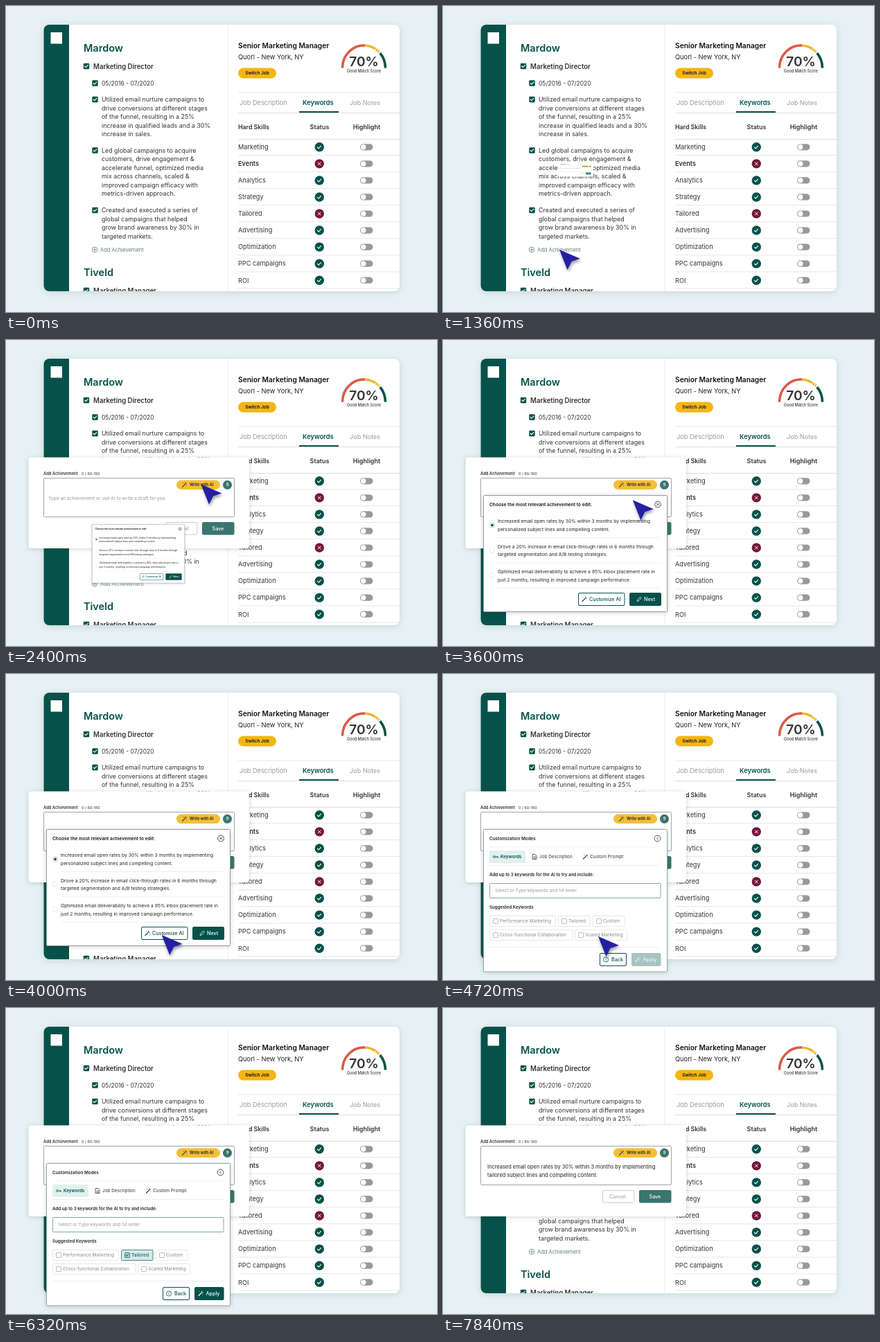
Recreate the animation shown at these times as an HTML page. Size 622 by 442 pixels, loop 8 s.

```html
<!DOCTYPE html>
<html lang="en">
<head>
<meta charset="utf-8">
<title>Resume builder</title>
<style>
  html, body { margin: 0; width: 100%; height: 100%; overflow: hidden; background: #e6f1f3; }
  svg { display: block; width: 622px; height: 442px; font-family: Inter, "Open Sans", sans-serif; }
  .soft { filter: drop-shadow(0 2px 5px #00303022); }
  .card { filter: drop-shadow(0 1px 3px #00202030); }
  .pointer { filter: drop-shadow(1px 3px 2px #0006); }
</style>
</head>
<body>
<svg id="stage" viewBox="0 0 622 442"></svg>
<script>
const GREEN = '#06524a', TEAL = '#3a756f', GOLD = '#f5b513', INK = '#333', GRAY = '#999';

// y is the vertical middle of the capitals
const text = (x, y, s, size, fill = INK, weight = 400, anchor = 'start') =>
  `<text x="${x}" y="${y + size * .36}" font-size="${size}" fill="${fill}" font-weight="${weight}" text-anchor="${anchor}">${s}</text>`;
const lines = (x, y, gap, size, list, fill) =>
  list.map((s, i) => text(x, y + gap * i, s, size, fill)).join('');
const box = (x, y, w, h, fill, r = 0, stroke = 'none', sw = 1) =>
  `<rect x="${x}" y="${y}" width="${w}" height="${h}" rx="${r}" fill="${fill}" stroke="${stroke}" stroke-width="${sw}"/>`;
const dot = (x, y, r, fill, stroke = 'none', sw = .8) =>
  `<circle cx="${x}" cy="${y}" r="${r}" fill="${fill}" stroke="${stroke}" stroke-width="${sw}"/>`;
const path = (d, stroke, sw = 1) =>
  `<path d="${d}" fill="none" stroke="${stroke}" stroke-width="${sw}" stroke-linecap="round" stroke-linejoin="round"/>`;
const rule = (x1, x2, y, color = '#e6e6e6', sw = 1) =>
  `<path d="M${x1} ${y}H${x2}" stroke="${color}" stroke-width="${sw}"/>`;

const tick = (x, y, color = '#fff', k = 1) =>
  path(`M${x - 2.3 * k} ${y}l${1.6 * k} ${1.7 * k}l${3 * k} ${-3.3 * k}`, color, 1.1);
const checked = (x, y) => box(x - 4.2, y - 4.2, 8.4, 8.4, GREEN, 1.2) + tick(x, y);
const wand = (x, y, color) =>
  path(`M${x - 3} ${y + 3}L${x + 1.4} ${y - 1.4}`, color, 1.2)
  + path(`M${x + 1.4} ${y - 3.4}l.4 1.6l1.6 .4M${x - 1.6} ${y - 2.6}h.1M${x + 2.8} ${y + 1.4}h.1`, color, .8);
const pencil = (x, y, color) =>
  path(`M${x - 2.8} ${y + 2.8}l.6-2.2l4-4l1.6 1.6l-4 4z`, color, .8);
const button = (x, y, w, h, s, tx, fill, stroke, color) =>
  box(x, y, w, h, fill, 1.5, stroke) + text(tx, y + h / 2, s, 7.2, color, 500);

// Arc on the score gauge; a and b run from 0 (left) to 1 (right)
function arc(a, b, color) {
  const at = f => `${516.5 - 31 * Math.cos(f * Math.PI)} ${89.5 - 32.5 * Math.sin(f * Math.PI)}`;
  return `<path d="M${at(a)}A31 32.5 0 0 1 ${at(b)}" fill="none" stroke="${color}" stroke-width="3.6"/>`;
}

function resume() {
  return text(112, 61, 'Mardow', 14.5, GREEN, 600)
    + checked(116, 87) + text(126, 88, 'Marketing Director', 9.65, INK, 600)
    + checked(128.5, 111.5) + text(138, 111.5, '05/2016 - 07/2020', 8.5)
    + checked(128.5, 135) + lines(138, 135, 12.5, 8.9, [
      'Utilized email nurture campaigns to', 'drive conversions at different stages',
      'of the funnel, resulting in a 25%', 'increase in qualified leads and a 30%', 'increase in sales.'])
    + checked(128.5, 208.5) + lines(138, 208.5, 12.5, 8.9, [
      'Led global campaigns to acquire', 'customers, drive engagement &amp;',
      'accelerate funnel, optimized media', 'mix across channels, scaled &amp;',
      'improved campaign efficacy with', 'metrics-driven approach.'])
    + checked(128.5, 295) + lines(138, 295, 12.5, 8.9, [
      'Created and executed a series of', 'global campaigns that helped',
      'grow brand awareness by 30% in', 'targeted markets.'])
    + dot(128, 352, 3.8, 'none', '#5d7f7b') + path('M126 352h4M128 350v4', '#5d7f7b', .8)
    + text(136, 352.5, 'Add Achievement', 7.5, '#5d7f7b')
    + text(112, 384.5, 'Tiveld', 14.5, GREEN, 600)
    + checked(116, 411) + text(126, 411.5, 'Marketing Manager', 9.65, INK, 600);
}

function score() {
  return text(335, 57.5, 'Senior Marketing Manager', 10.25, '#111', 600)
    + text(335, 74, 'Quorl - New York, NY', 9.3, '#222')
    + box(335, 89.5, 55, 15, GOLD, 7.5) + text(362.5, 97, 'Switch Job', 6.4, '#222', 700, 'middle')
    + arc(0, .52, '#db5a45') + arc(.52, .75, '#edb52c') + arc(.77, 1, GREEN)
    + dot(535, 63.5, 2.2, GOLD, '#fff')
    + text(516.5, 80, '70%', 19.2, INK, 600, 'middle')
    + text(516.5, 94, 'Good Match Score', 5.5, INK, 500, 'middle');
}

function keywords() {
  const rows = ['Marketing', 'Events', 'Analytics', 'Strategy', 'Tailored', 'Advertising',
    'Optimization', 'PPC campaigns', 'ROI'];
  return rule(335, 568, 125)
    + text(337, 139.5, 'Job Description', 9.2, GRAY)
    + text(428, 139.5, 'Keywords', 9.3, GREEN, 600)
    + text(496, 139.5, 'Job Notes', 9.1, GRAY)
    + rule(335, 568, 154.5, '#ddd') + rule(423, 480, 153, GREEN, 2)
    + text(335, 175, 'Hard Skills', 8.8, INK, 600)
    + text(452.5, 175, 'Status', 9, INK, 600, 'middle')
    + text(520.5, 175, 'Highlight', 9.1, INK, 600, 'middle')
    + rule(335, 568, 192.5, '#ddd')
    + rows.map((s, i) => {
      const y = 203.8 + 24.05 * i, miss = s === 'Events' || s === 'Tailored';
      return text(335, y, s, 9.2, INK, s === 'Events' ? 600 : 400)
        + dot(452.3, y, 6.7, miss ? '#74163a' : GREEN)
        + (miss ? path(`M450.3 ${y - 2}l4 4m0-4l-4 4`, '#fff') : tick(452, y + .2, '#fff', 1.1))
        + box(511, y - 4.6, 18.5, 9.2, GRAY, 4.6) + dot(515.8, y, 3.7, '#fff')
        + rule(335, 568, y + 11.8);
    }).join('');
}

function editor() {
  return box(32.5, 169.5, 318.5, 131.5, '#fff', 4)
    + text(54, 193, 'Add Achievement', 5.8, INK, 600) + text(109, 193, '0 / 60-180', 5.4)
    + box(54.5, 199.5, 275, 56, '#fff', 1, '#a3a3a3')
    + box(246, 202.5, 63, 13.5, '#f4bf38', 6.75) + wand(257.5, 209.3, INK)
    + text(265, 209.3, 'Write with AI', 5.6, '#222', 600)
    + dot(319.5, 209.3, 6.5, TEAL) + text(319.5, 209.3, '9', 5.5, '#fff', 600, 'middle')
    + `<g id="hint">${text(61, 228.5, 'Type an achievement or use AI to write a draft for you.', 6.65, GRAY)}</g>`
    + `<g id="result">${lines(64, 229, 12, 7.45, [
      'Increased email open rates by 30% within 3 months by implementing',
      'tailored subject lines and compelling content.'], '#222')}</g>`
    + button(230.5, 263.5, 45.5, 17.5, 'Cancel', 240, '#fff', '#ccc', '#aaa')
    + button(283.5, 263.5, 45.5, 17.5, 'Save', 297.5, TEAL, TEAL, '#fff');
}

function choices() {
  const options = [
    ['Increased email open rates by 30% within 3 months by implementing', 'personalized subject lines and compelling content.'],
    ['Drove a 20% increase in email click-through rates in 6 months through', 'targeted segmentation and A/B testing strategies.'],
    ['Optimized email deliverability to achieve a 95% inbox placement rate in', 'just 2 months, resulting in improved campaign performance.']];
  return box(58.5, 224.5, 265, 168, '#fff', 1, '#999')
    + text(67, 237.5, 'Choose the most relevant achievement to edit:', 6.6, '#111', 600)
    + dot(310, 237.5, 4.4, '#fff', '#222') + path('M308.3 235.8l3.4 3.4m0-3.4l-3.4 3.4', '#222', .8)
    + options.map((pair, i) => {
      const y = 262 + 36.4 * i;
      return dot(71, y + 5.5, 3.7, '#fff', i ? '#e6e6e6' : '#bbb')
        + (i ? '' : dot(71, y + 5.5, 1.9, GREEN))
        + lines(79, y, 11.5, 6.75, pair, '#222') + rule(79, 314, y + 23.5, '#efefef');
    }).join('')
    + button(195.5, 365.5, 66.5, 18, 'Customize AI', 211, '#fff', GREEN, GREEN) + wand(204, 374.5, GREEN)
    + button(269.5, 365.5, 45, 18, 'Next', 290, GREEN, GREEN, '#fff') + pencil(283, 374.5, '#fff');
}

const chip = (x, y, w, s) => box(x + .5, y - 7.5, w, 15, '#fff', 1, '#e8e8e8')
  + box(x + 5.5, y - 3.5, 7, 7, '#fff', .8, '#aaa', .8) + text(x + 15, y, s, 6.65, '#8a8a8a');

function customize() {
  return box(58.5, 224.5, 265, 205.5, '#fff', 1, '#8fa9a6')
    + text(67, 237.5, 'Customization Modes', 6.35, '#222', 600)
    + dot(309.5, 237.5, 4.4, '#fff', '#222') + path('M310.3 235.7l-1.8 1.8l1.8 1.8', '#222', .8)
    + rule(67, 314, 250, '#f3f3f3')
    + box(67, 255, 52, 18, '#e1f0ee', 1)
    + dot(74, 264, 1.5, 'none', GREEN) + path('M75.5 264h4v1.3M78 264v1', GREEN, .8)
    + text(83, 264, 'Keywords', 6.3, GREEN, 600)
    + path('M129.5 260.5h3.5l2 2v5h-5.5zM131 264h2.6M131 266h2.6', INK, .8)
    + text(139, 264, 'Job Description', 6.4) + wand(205.5, 264, INK) + text(212, 264, 'Custom Prompt', 6.6)
    + rule(67, 314, 276.5, '#eee')
    + text(67, 289.5, 'Add up to 3 keywords for the AI to try and include:', 6.25, '#222', 600)
    + box(67.5, 302.5, 246.5, 21, '#fff', 1, '#86a5a2')
    + text(75, 313, 'Select or Type keywords and hit enter', 6.6, GRAY)
    + text(67, 336.5, 'Suggested Keywords', 6.2, '#222', 600)
    + chip(67, 357, 95, 'Performance Marketing') + chip(166, 357, 45.5, 'Tailored') + chip(216, 357, 45.5, 'Custom')
    + chip(67, 377, 119, 'Cross-functional Collaboration') + chip(190, 377, 75, 'Scaled Marketing')
    + rule(67, 314, 394.5, '#eee')
    + button(226.5, 403.5, 38, 18, 'Back', 243, '#fff', GREEN, GREEN)
    + dot(235, 412.5, 3.6, 'none', GREEN) + path('M235.7 411l-1.5 1.5l1.5 1.5', GREEN, .8)
    + button(272.5, 403.5, 41.5, 18, 'Apply', 288.5, '#a5c4c2', '#a5c4c2', '#eef5f4') + wand(281, 412.5, '#eef5f4')
    + `<g id="picked">${box(166.5, 349.5, 45.5, 15, '#d5ebe8', 1, '#4d8a83')
      + box(171.5, 353.5, 7, 7, '#a9d0cb', .8, TEAL, .9) + tick(174.8, 357, TEAL, .8) + text(181, 357, 'Tailored', 6.65, GREEN)
      + button(272.5, 403.5, 41.5, 18, 'Apply', 288.5, GREEN, GREEN, '#fff') + wand(281, 412.5, '#fff')}</g>`;
}

const $ = id => document.getElementById(id);
$('stage').innerHTML = `
  <clipPath id="frame"><rect x="54.5" y="27" width="513.5" height="385" rx="8"/></clipPath>
  <rect width="622" height="442" fill="#e6f1f3"/>
  <g class="soft">${box(54.5, 27, 513.5, 385, '#fff', 8)}</g>
  <g clip-path="url(#frame)">
    ${box(54, 27, 37, 385, GREEN)}${box(64.5, 38, 16.5, 16.5, '#fff')}
    ${box(319.5, 27, 1, 385, '#e9eeee')}
    ${resume()}${score()}${keywords()}
  </g>
  <g id="editor" class="card">${editor()}</g>
  <g id="choices" class="card">${choices()}</g>
  <g id="customize" class="card">${customize()}</g>
  <g id="pointer" class="pointer"><path d="M0 0L30 13L17.5 17L11.5 29Z" fill="#251fa3"/></g>`;

const clamp = v => Math.min(1, Math.max(0, v));
const smooth = v => v * v * (3 - 2 * v);
const cubic = v => v < .5 ? 4 * v ** 3 : 1 - 4 * (1 - v) ** 3;
const ramp = (t, a, b) => clamp((t - a) / (b - a));
const show = (id, on) => $(id).style.display = on ? '' : 'none';

function zoom(id, cx, cy, k) {
  show(id, k > .01);
  $(id).setAttribute('transform', `translate(${cx} ${cy}) scale(${k}) translate(${-cx} ${-cy})`);
}

// Pointer moves: start, end, x, y
const moves = [[240, 1040, 168, 352], [1680, 2160, 281.5, 208.5], [3360, 4110, 224, 379],
  [4720, 5280, 185, 358], [5520, 6000, 290, 408]];

function draw(t) {
  zoom('editor', 191.5, 236, smooth(ramp(t, 1280, 1600)));
  zoom('choices', 191, 309, t < 4720 ? smooth(ramp(t, 2240, 2560)) : 0);
  zoom('customize', 191, 327.5, t < 4720 ? 0 : 1 - smooth(ramp(t, 6400, 6640)));
  show('picked', t >= 5440);
  show('hint', t < 6400);
  show('result', t >= 6400);

  let x = 300, y = 300;
  for (const [a, b, tx, ty] of moves) {
    const k = cubic(ramp(t, a, b));
    x += (tx - x) * k;
    y += (ty - y) * k;
  }
  show('pointer', t > 80 && t < 6320);
  $('pointer').setAttribute('transform', `translate(${x} ${y})`);
  $('pointer').setAttribute('opacity', ramp(t, 80, 400));
}

const start = performance.now();
function tickFrame() {
  draw((performance.now() - start) % 8000);
  requestAnimationFrame(tickFrame);
}
tickFrame();
</script>
</body>
</html>
```
